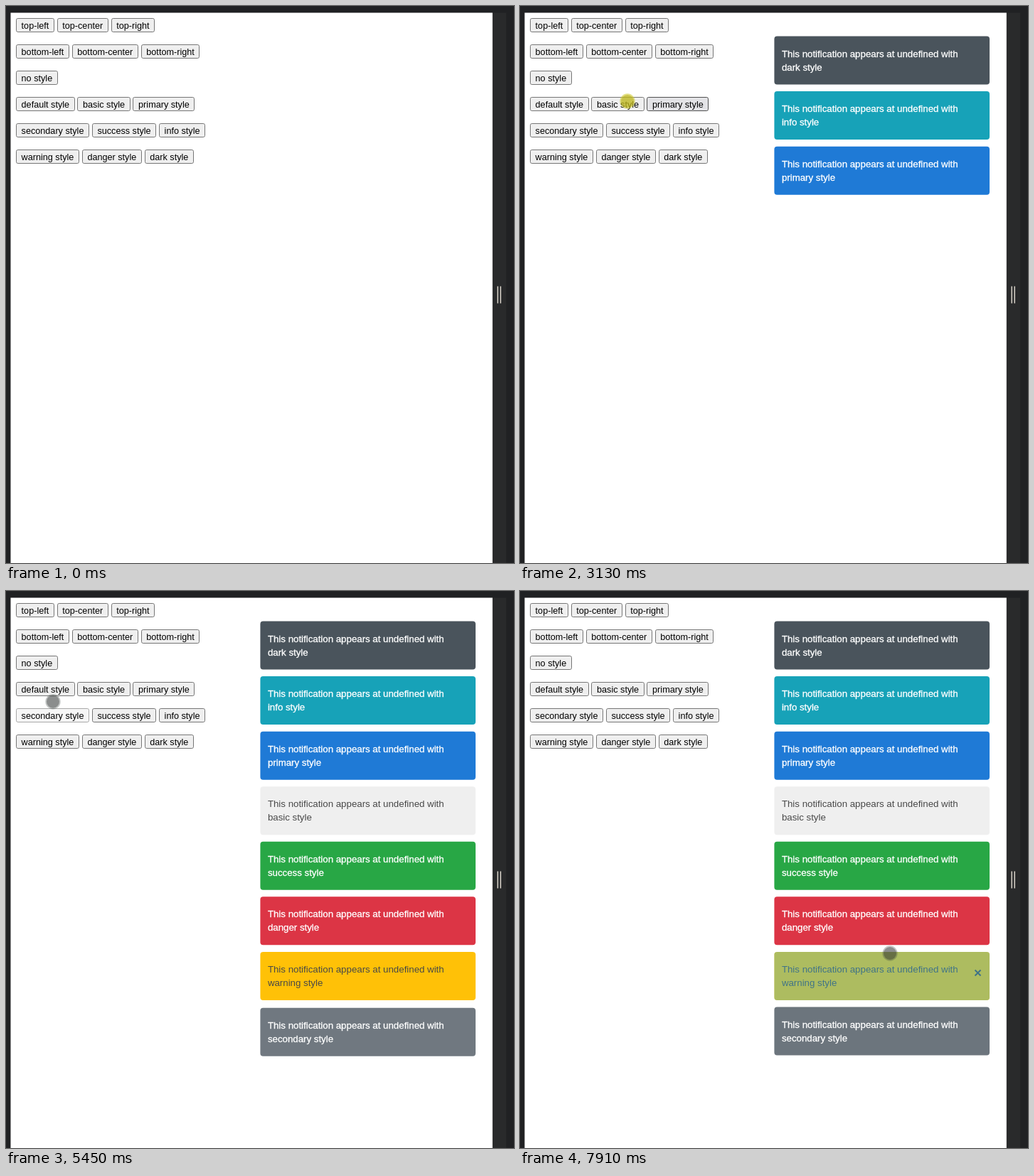
Write an HTML page that moves like this. It is 714 px wide and 784 px high and loops after 7.99 s.

```html
<!DOCTYPE html>
<html lang="en">
<head>
<meta charset="utf-8">
<title>Notification styles</title>
<style>
html, body { margin: 0; width: 100%; height: 100%; overflow: hidden; background: #202123; }
svg { display: block; width: 714px; height: 784px; font-family: "Liberation Sans", Arial, sans-serif; }
.button rect { fill: #efefef; stroke: #767676; }
.button.active rect { fill: #f6f6f6; stroke: #a8a8a8; }
.button.hover rect { fill: #e3e3e6; stroke: #4f4f4f; }
.button text { font-size: 12.65px; }
.toast text { font-size: 13.27px; }
.toast .light { fill: #fff; stroke: #fff; stroke-width: .3px; }
.toast .dark { fill: #484848; }
</style>
</head>
<body>
<svg id="stage" viewBox="0 0 714 784">
  <rect width="714" height="784" fill="#202123"/>
  <rect x="684" y="9.5" width="19" height="775" fill="#292a2b"/>
  <rect x="6.5" y="9.5" width="677.3" height="775" fill="#fff"/>
  <path d="M691.2 394.5V418.5M695.2 394.5V418.5" stroke="#cdc8bf" stroke-width="1.6"/>
</svg>
<script>
const LOOP = 7990, ENTER = 70;
const stage = document.getElementById('stage');

function add(parent, tag, attrs, text) {
  const el = document.createElementNS('http://www.w3.org/2000/svg', tag);
  for (const key in attrs) el.setAttribute(key, attrs[key]);
  if (text) el.textContent = text;
  parent.appendChild(el);
  return el;
}

// Buttons flow from left to right, each as wide as its label
const PAD = 7.6, GAP = 3.8;
const buttons = {};
[
  'top-left,top-center,top-right',
  'bottom-left,bottom-center,bottom-right',
  'no style',
  'default style,basic style,primary style',
  'secondary style,success style,info style',
  'warning style,danger style,dark style'
].forEach((row, i) => {
  const y = 17 + 37 * i;
  let x = 14;
  for (const label of row.split(',')) {
    const g = add(stage, 'g', { class: 'button' });
    const box = add(g, 'rect', { y: y + .5, height: 19, rx: 2.2 });
    const text = add(g, 'text', { x: x + PAD, y: y + 14.5 }, label);
    const width = text.getComputedTextLength() + 2 * PAD;
    const left = Math.round(x), right = Math.round(x + width);
    box.setAttribute('x', left + .5);
    box.setAttribute('width', right - left - 1);
    buttons[label] = g;
    x += width + GAP;
  }
});

// Each tap: time, place and, for a curved approach, the bend of the path
const taps = [
  { style: 'dark', at: 1120, to: [211, 211], bend: [215, 360], fill: '#4a545c' },
  { style: 'info', at: 1753, to: [236, 172], fill: '#17a2b8' },
  { style: 'primary', at: 2300, to: [231, 136], fill: '#1f7ad6' },
  { style: 'basic', at: 3240, to: [151, 134], bend: [105, 10], fill: '#efefef' },
  { style: 'success', at: 3800, to: [165, 173], fill: '#28a745' },
  { style: 'danger', at: 4380, to: [147, 209], fill: '#dc3545' },
  { style: 'warning', at: 4797, to: [68, 211], fill: '#ffc107' },
  { style: 'secondary', at: 5294, to: [66, 176], fill: '#6c757d' },
  { style: 'default', at: 5950, to: [66, 143], fill: '#fff' },
  { closes: 'default', at: 7330, to: [519, 668], bend: [604, 120] },
  { closes: 'warning', at: 7800, to: [520, 510] }
];
const darkText = ['basic', 'warning', 'default'];

const toasts = taps.filter(tap => tap.style).map(({ style, at, fill }, i) => {
  const y = 42.5 + 77.57 * i;
  const tone = darkText.includes(style) ? 'dark' : 'light';
  const box = { x: 357.4, y, width: 302.6, height: 68, rx: 4 };
  const g = add(stage, 'g', { class: 'toast' });
  add(g, 'rect', { ...box, fill });
  if (style === 'default') {
    add(g, 'rect', { ...box, x: 358, y: y + .5, width: 301.5, height: 67, fill: 'none', stroke: '#c8c8c8' });
  }
  add(g, 'text', { x: 367.9, y: y + 29.1, class: tone }, 'This notification appears at undefined with');
  add(g, 'text', { x: 367.9, y: y + 48.1, class: tone }, style + ' style');
  const touch = add(g, 'g', {});
  add(touch, 'path', { d: `M639.5 ${y + 25.5}l8 8m0 -8l-8 8`, stroke: '#484848', 'stroke-width': 2 });
  add(touch, 'rect', { ...box, fill: '#33b5e5', 'fill-opacity': .4 });
  const close = taps.find(tap => tap.closes === style);
  return {
    g, touch, at,
    touched: close ? close.at : Infinity,
    removed: style === 'default' ? close.at + 60 : Infinity,
    next: taps[i + 1].at,
    button: buttons[style + ' style']
  };
});

const cursor = add(stage, 'g', {});
const halo = add(cursor, 'circle', { r: 10.7 });
const core = add(cursor, 'circle', { r: 9 });

// CSS "ease": cubic-bezier(.25, .1, .25, 1)
function ease(x) {
  if (x <= 0) return 0;
  if (x >= 1) return 1;
  let lo = 0, hi = 1, s;
  for (let n = 0; n < 18; n++) {
    s = (lo + hi) / 2;
    if (.75 * s * (1 - s) + s ** 3 < x) lo = s; else hi = s;
  }
  return .3 * s * (1 - s) ** 2 + 3 * s * s * (1 - s) + s ** 3;
}

// The pointer leaves right after a tap and rests before the next one
function pointerAt(t) {
  let from = [365, 538], leave = ENTER;
  for (const { at, to, bend } of taps) {
    const arrive = at - 160;
    if (t < at - 30) {
      const s = ease((t - leave) / (arrive - leave));
      return from.map((a, i) => {
        const mid = bend ? bend[i] : (a + to[i]) / 2;
        return a * (1 - s) ** 2 + 2 * mid * s * (1 - s) + to[i] * s * s;
      });
    }
    from = to;
    leave = at - 30;
  }
  return from;
}

function render(t) {
  for (const { g, touch, at, touched, removed, next, button } of toasts) {
    const open = ease((t - at) / 200);
    g.setAttribute('opacity', open * (1 - ease((t - removed) / 180)));
    g.setAttribute('transform', `translate(0 ${47 * (1 - open)})`);
    touch.setAttribute('visibility', t >= touched ? 'visible' : 'hidden');

    const idle = t < at - 40 || t >= next - 40;
    button.setAttribute('class', 'button' + (idle ? '' : t < at + 180 ? ' active' : ' hover'));
  }

  const down = taps.some(({ at }) => t >= at - 140 && t < at - 30);
  cursor.setAttribute('visibility', t < ENTER ? 'hidden' : 'visible');
  cursor.setAttribute('transform', `translate(${pointerAt(t)})`);
  halo.setAttribute('fill', down ? 'rgba(205,200,40,.55)' : 'rgba(60,70,65,.3)');
  core.setAttribute('fill', down ? 'rgba(180,172,20,.5)' : 'rgba(35,35,35,.35)');
}

const began = performance.now();
function tick() {
  render((performance.now() - began) % LOOP);
  requestAnimationFrame(tick);
}
render(0);
requestAnimationFrame(tick);
</script>
</body>
</html>
```
